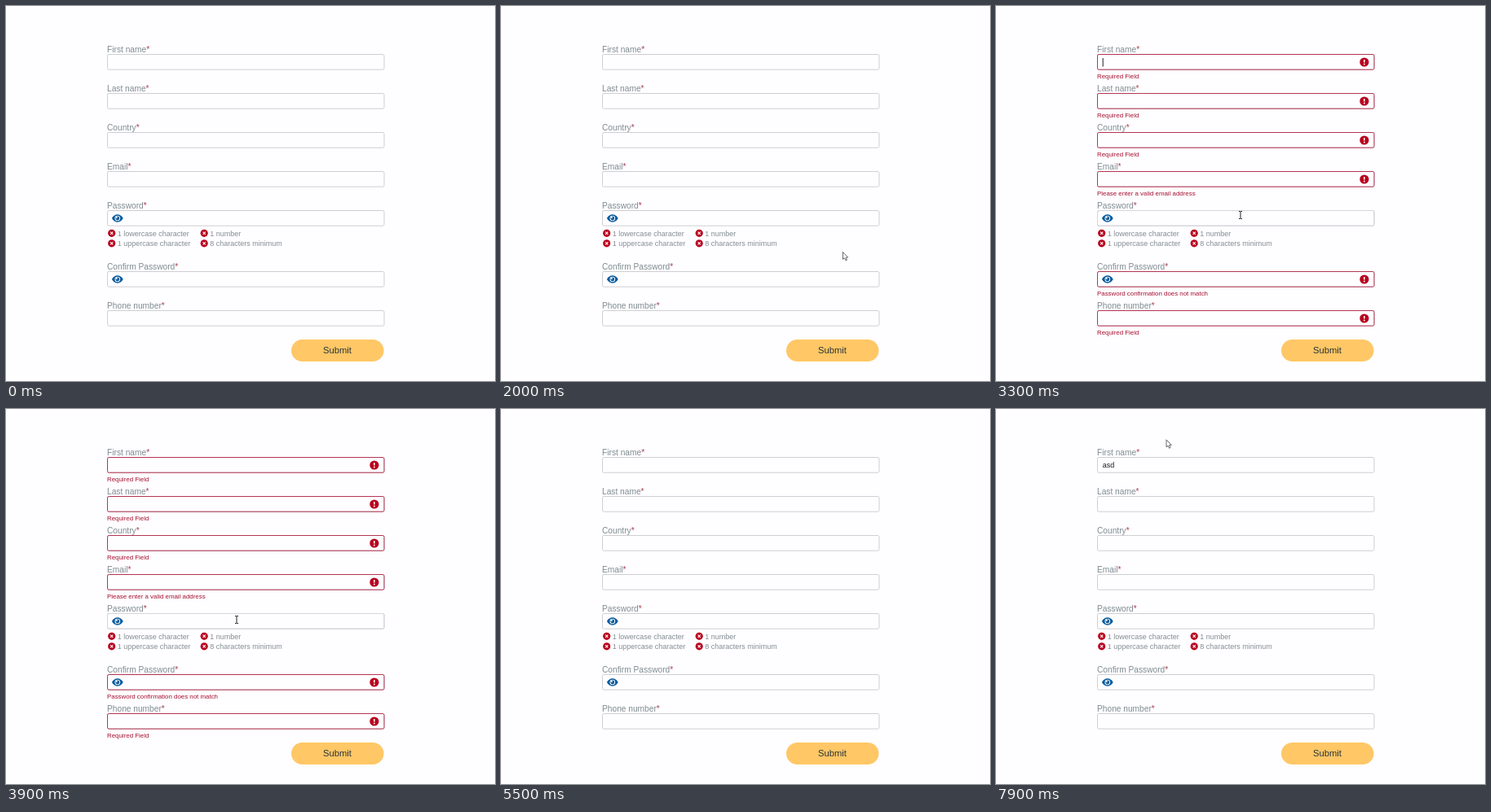
Write an HTML page that moves like this. It is 600 px wide and 461 px high and loops after 8 s.

```html
<!DOCTYPE html>
<html lang="en">
<head>
<meta charset="utf-8">
<title>Form validation</title>
<style>
  html, body { margin: 0; width: 100%; height: 100%; overflow: hidden; background: #fefdff; }
  svg { display: block; width: 600px; height: 461px; }
  text { font-family: "Liberation Sans", Arial, sans-serif; }
  .label { font-size: 10.2px; fill: #7f8c90; }
  .label tspan { fill: #a8404f; }
  .rule { font-size: 9px; fill: #838d92; }
  .error { font-size: 7.9px; fill: #a5102f; }
  .value { font-size: 9px; fill: #1b1b1f; }
  .submit { font-size: 11.25px; fill: #2a3336; }
  .box { fill: #fefdff; stroke: #cfced2; stroke-width: 1; }
  .wrong { fill: none; stroke: #b43552; stroke-width: 1; }
  .calm { fill: none; stroke: #d6d5dc; stroke-width: 1; }
  .focus { fill: none; stroke: #a3abb3; stroke-width: 1; }
</style>
</head>
<body>
<svg id="stage" viewBox="0 0 600 461"></svg>
<script>
const LOOP = 8000, STEP = 100;
const RED = '#b8001f', BLUE = '#075a9c';
const stage = document.getElementById('stage');

function add(parent, tag, attrs, text) {
  const el = document.createElementNS('http://www.w3.org/2000/svg', tag);
  for (const k in attrs) el.setAttribute(k, attrs[k]);
  if (text) el.textContent = text;
  return parent.appendChild(el);
}
const write = (parent, cls, x, y, s) => add(parent, 'text', { class: cls, x, y }, s);
const frame = (parent, cls, top) =>
  add(parent, 'rect', { class: cls, x: 124.5, y: top + 0.5, width: 339.5, height: 18.7, rx: 1.8 });

// label, top of the input, error message, has eye
const fields = [
  ['First name', 59, 'Required Field'],
  ['Last name', 107, 'Required Field'],
  ['Country', 155, 'Required Field'],
  ['Email', 203, 'Please enter a valid email address'],
  ['Password', 251, '', true],
  ['Confirm Password', 326, 'Password confirmation does not match', true],
  ['Phone number', 374, 'Required Field']
];
const rules = [
  ['1 lowercase character', 129.7, 279.3], ['1 number', 243.2, 279.3],
  ['1 uppercase character', 129.7, 291.8], ['8 characters minimum', 243.2, 291.8]
];

function drawEye(parent, y) {
  const g = add(parent, 'g', { transform: `translate(136.8 ${y})` });
  add(g, 'path', { d: 'M-6.9 0C-3.6-6.2 3.6-6.2 6.9 0C3.6 6.2-3.6 6.2-6.9 0Z', fill: BLUE });
  add(g, 'circle', { r: 3.3, fill: '#fff' });
  add(g, 'circle', { r: 2.4, fill: BLUE });
  add(g, 'circle', { cx: -1, cy: -1, r: 0.9, fill: '#fff' });
}
function drawCross(parent, x, y) {
  add(parent, 'circle', { cx: x, cy: y, r: 4.6, fill: RED });
  add(parent, 'path', { d: `M${x - 1.6} ${y - 1.6}l3.2 3.2m0-3.2l-3.2 3.2`, stroke: '#fff', 'stroke-width': 1.1 });
}
function drawAlert(parent, y) {
  add(parent, 'circle', { cx: 451.9, cy: y, r: 5.6, fill: RED });
  add(parent, 'path', { d: `M451.9 ${y - 3.1}v3.6`, stroke: '#fff', 'stroke-width': 1.5 });
  add(parent, 'circle', { cx: 451.9, cy: y + 2.5, r: 0.9, fill: '#fff' });
}

const form = add(stage, 'g', {});
const focusBox = frame(stage, 'focus', 59);
const marks = add(stage, 'g', {});
const messages = add(stage, 'g', {});

for (const [name, top, msg, eye] of fields) {
  const label = write(form, 'label', 124, top - 2.4, name);
  add(label, 'tspan', {}, '*');
  frame(form, 'box', top);
  if (eye) drawEye(form, top + 10);
  if (msg) {
    frame(marks, 'wrong', top);
    drawAlert(marks, top + 10);
    write(messages, 'error', 124, top + 30.2, msg);
  } else frame(marks, 'calm', top);
}
for (const [s, x, y] of rules) {
  drawCross(form, x, y);
  write(form, 'rule', x + 7, y + 3.3, s);
}
add(form, 'rect', { x: 350, y: 410, width: 113.5, height: 27, rx: 13.5, fill: '#ffc766' });
const submit = write(form, 'submit', 406.5, 427, 'Submit');
submit.setAttribute('text-anchor', 'middle');

const value = write(stage, 'value', 130.7, 72, '');
const caret = add(stage, 'rect', { y: 64, width: 1, height: 10.5, fill: '#222' });

const pointer = add(stage, 'g', {});
const line = { fill: '#fff', stroke: '#3a3a3e', 'stroke-width': 0.75, 'stroke-linejoin': 'round' };
const shapes = {
  arrow: add(pointer, 'path', { ...line, d: 'M0 0V9L2 7.2L3.5 10.4L5 9.7L3.6 6.6H6.2Z' }),
  hand: add(pointer, 'path', { ...line,
    d: 'M-1 0.4Q0-0.6 1 0.4V4Q2 3.2 2.8 4.2Q3.8 3.6 4.4 4.6Q5.6 4.2 5.8 5.4V8.6L4.8 11V12.4H-0.6L-3.6 7.6Q-3.8 5.8-2.2 6.6L-1 7.6Z' }),
  beam: add(pointer, 'path', { fill: 'none', stroke: '#222', 'stroke-width': 1,
    d: 'M-2-4.5H-0.6L0-4L0.6-4.5H2M0-4V4M-2 4.5H-0.6L0 4L0.6 4.5H2' })
};

// pointer: time, x, y, shape
const path = [
  [1200, 300, 160, 'beam'], [1400, 290, 225, 'arrow'], [1600, 318, 300, 'arrow'],
  [1800, 385, 318, 'arrow'], [2000, 419.5, 302.5, 'arrow'], [2200, 422, 340, 'beam'],
  [2300, 421, 365, 'arrow'], [2400, 417, 395, 'arrow'], [2500, 413, 414, 'hand'],
  [2600, 411.5, 420.5, 'hand'], [3000, 411.5, 420.5, 'hand'], [3100, 385, 380, 'beam'],
  [3200, 335, 305, 'arrow'], [3300, 300, 257, 'beam'], [3800, 283, 259, 'beam'],
  [4200, 283, 259, 'beam'], [6800, 209, 63, 'beam'], [7600, 209, 63, 'beam'],
  [7700, 210, 57, 'arrow'], [7800, 209.5, 45, 'arrow'], [7900, 209, 37.8, 'arrow']
];
const shown = [[1199, 0], [1200, 0.5], [1300, 1], [3900, 1], [4200, 0], [6799, 0], [6800, 1]];
const markFade = [[2999, 0], [3000, 1], [5000, 1], [5300, 0]];
const textFade = [[2999, 0], [3000, 0.28], [3300, 1], [5000, 1], [5300, 0]];
const focusFade = [[6700, 0], [6900, 1], [7600, 1], [7800, 0]];
const caretOn = [[3000, 3500], [4000, 4500], [6800, 7700]];

function tween(keys, t, col = 1) {
  let i = 0;
  while (i < keys.length && keys[i][0] <= t) i++;
  if (i === 0) return keys[0][col];
  if (i === keys.length) return keys[i - 1][col];
  const a = keys[i - 1], b = keys[i];
  return a[col] + (b[col] - a[col]) * (t - a[0]) / (b[0] - a[0]);
}

function render(t) {
  marks.setAttribute('opacity', tween(markFade, t));
  const fade = tween(textFade, t);
  messages.setAttribute('opacity', fade);
  messages.setAttribute('transform', `translate(0 ${(1 - fade) * 5.5})`);
  focusBox.setAttribute('opacity', tween(focusFade, t));

  const typed = Math.max(0, Math.min(3, Math.floor((t - 7200) / 100)));
  value.textContent = 'asd'.slice(0, typed);
  caret.setAttribute('x', 130.7 + [0, 5, 9.5, 14.5][typed]);
  caret.setAttribute('opacity', caretOn.some(([a, b]) => t >= a && t < b) ? 1 : 0);

  const kind = path.filter(p => p[0] <= t).pop();
  for (const k in shapes)
    shapes[k].setAttribute('visibility', kind && kind[3] === k ? 'visible' : 'hidden');
  pointer.setAttribute('opacity', tween(shown, t));
  pointer.setAttribute('transform', `translate(${tween(path, t, 1)} ${tween(path, t, 2)})`);
}

const start = performance.now();
function tick() {
  const t = Math.max(0, performance.now() - start) % LOOP;
  render(Math.floor(t / STEP) * STEP);
  requestAnimationFrame(tick);
}
render(0);
requestAnimationFrame(tick);
</script>
</body>
</html>
```
